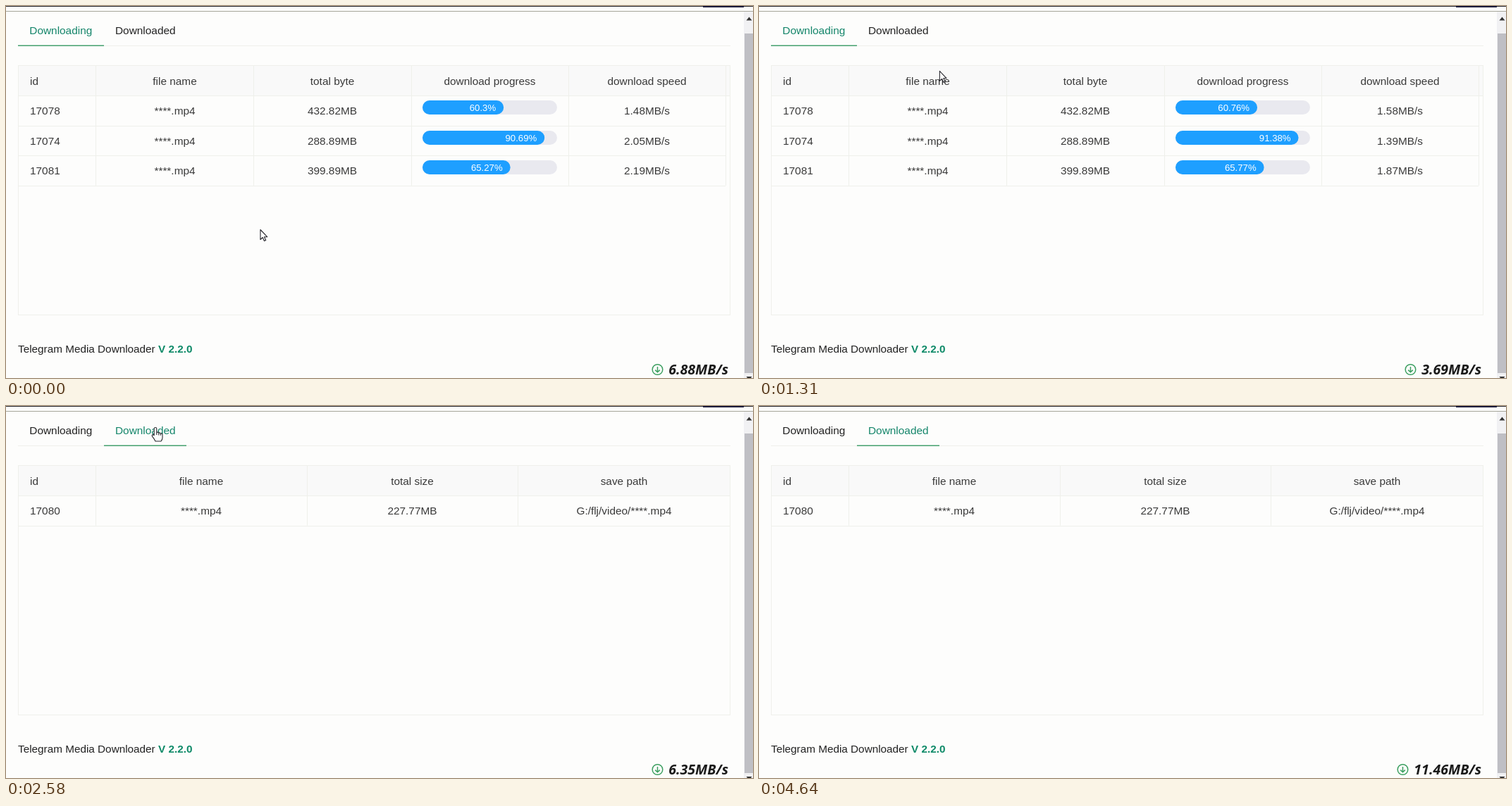
Animation of 1060 by 528 pixels, one loop 4820 ms. Source, as an HTML page:

```html
<!DOCTYPE html>
<html lang="en">
<head>
<meta charset="utf-8">
<title>Downloads</title>
<style>
html, body { margin: 0; width: 100%; height: 100%; overflow: hidden; background: #fdfdfc; }
svg { display: block; width: 1060px; height: 528px; font: 15.4px "Liberation Sans", Arial, sans-serif; }
.total { font: italic 700 19.6px "Open Sans", "Noto Sans", sans-serif; }
.percent { font-size: 13.2px; }
.footer { font-size: 15.3px; }
</style>
</head>
<body>
<svg id="stage" viewBox="0 0 1060 528"></svg>
<script>
const LOOP = 4820, ROW = 42.6;
const LINE = '#eff0eb', INK = '#3a3a3a', DARK = '#222222', GREEN = '#14856a';
const stage = document.getElementById('stage');

// Each update: [start time, value]
const totals = [[0, '6.88'], [450, '3.69'], [1480, '5.23'], [2500, '6.35'], [4580, '11.46']];
const files = [
  { id: 17078, size: '432.82', done: [60.3, 60.76, 61.23], speed: ['1.48', '1.58', '1.58'] },
  { id: 17074, size: '288.89', done: [90.69, 91.38, 92.08], speed: ['2.05', '1.39', '1.92'] },
  { id: 17081, size: '399.89', done: [65.27, 65.77, 66.02], speed: ['2.19', '1.87', '1.5'] }
];
const updates = [0, 760, 1700];
const SWITCH = 2110;

// Pointer tip: [time, x, y]
const path = [[0, 360.5, 317], [910, 360.5, 317], [1310, 256, 92], [1640, 212, 31],
  [2810, 212, 31], [3130, 120, 36], [3180, 120, 36], [3340, 470, 182], [3800, 1012, 532]];

const clamp = v => Math.max(0, Math.min(1, v));
const ease = v => { v = clamp(v); return v * v * (3 - 2 * v); };
const mix = (a, b, k) => a + (b - a) * k;
const text = (x, y, s, anchor = 'middle', fill = INK, extra = '') =>
  `<text x="${x}" y="${y}" text-anchor="${anchor}" fill="${fill}" ${extra}>${s}</text>`;
const rect = (x, y, w, h, fill, rx = 0) =>
  `<rect x="${x}" y="${y}" width="${w}" height="${h}" rx="${rx}" fill="${fill}"/>`;

function fade(from, to, k) {
  const rgb = c => c.match(/\w\w/g).map(h => parseInt(h, 16));
  const end = rgb(to);
  return `rgb(${rgb(from).map((v, i) => Math.round(mix(v, end[i], k)))})`;
}

function frame() {
  return rect(0, 0, 1060, 1, '#25252b') + rect(989, 0, 58, 2, '#1b1b3a') +
    rect(0, 7, 1060, 1, '#a5a599') +
    rect(1047, 8, 13, 520, '#f1f1f3') + rect(1048, 39, 12, 482, '#bfbfc4') +
    '<path d="M1050.5 20.5l4-5 4 5zM1050.5 526h8l-4 5z" fill="#333"/>' +
    rect(17, 56, 1011, 1, LINE) +
    text(17, 492, 'Telegram Media Downloader <tspan font-weight="700" fill="#0f8a68">V 2.2.0</tspan>',
      'start', DARK, 'class="footer"');
}

function tabs(t) {
  const k = clamp((t - 2200) / 250), second = t >= SWITCH;
  return text(33.3, 39.5, 'Downloading', 'start', fade(GREEN, DARK, k)) +
    text(155, 39.5, 'Downloaded', 'start', fade(DARK, GREEN, k)) +
    rect(second ? 139 : 17, 55.5, second ? 117 : 122, 1.5, '#45a06e');
}

function table(heads, centers, edges, rows, right) {
  let out = rect(17, 84, 1011, 43, '#f9f9f9') +
    `<rect x="17.5" y="84.5" width="1010" height="354" fill="none" stroke="${LINE}"/>`;
  for (let i = 0; i <= rows; i++)
    out += rect(17, Math.round(127 + ROW * i), (i ? right : 1028) - 17, 1, LINE);
  for (const x of edges) out += rect(x, 85, 1, 42 + ROW * rows, LINE);
  return out + text(34, 112, 'id', 'start') +
    heads.map((h, i) => text(centers[i], 112, h)).join('');
}

function downloading(t) {
  const n = updates.filter(u => t >= u).length - 1;
  const k = n ? ease((t - updates[n]) / 130) : 1;
  const centers = [239.5, 463, 686.5, 909.5];
  let out = table(['file name', 'total byte', 'download progress', 'download speed'],
    centers, [127, 351, 575, 798, 1021], 3, 1021);
  files.forEach((f, i) => {
    const y = Math.round(154 + ROW * i);
    const w = 1.91 * mix(f.done[Math.max(0, n - 1)], f.done[n], k);
    out += text(34, y, f.id, 'start') + text(centers[0], y, '****.mp4') +
      text(centers[1], y, f.size + 'MB') +
      rect(591, y - 20, 191, 20, '#e9e9ef', 10) + rect(591, y - 20, w, 20, '#1e9fff', 10) +
      text(591 + w - 11, y - 5, f.done[n] + '%', 'end', '#fff', 'class="percent"') +
      text(centers[3], y, f.speed[n] + 'MB/s');
  });
  return out;
}

function downloaded() {
  const centers = [277, 576.5, 877];
  const cells = ['****.mp4', '227.77MB', 'G:/flj/video/****.mp4'];
  return table(['file name', 'total size', 'save path'], centers, [127, 427, 726], 1, 1028) +
    text(34, 154, 17080, 'start') + cells.map((c, i) => text(centers[i], 154, c)).join('');
}

function total(t) {
  const value = totals.filter(s => t >= s[0]).pop()[1];
  const x = value.length > 4 ? 913.5 : 924.5;
  return `<g transform="translate(${x} 516)" fill="none" stroke="#3c9f60" stroke-width="1.5">
    <circle r="7.3"/><path d="M0-4V3.6M-3.3 .6L0 3.8 3.3 .6"/></g>` +
    text(1025, 523, value + 'MB/s', 'end', '#1a1a1a', 'class="total"');
}

function pointer(t) {
  const i = path.findIndex(p => p[0] > t);
  if (i < 0) return '';
  const [a, b] = [path[i - 1], path[i]];
  const k = (t - a[0]) / (b[0] - a[0]);
  const x = mix(a[1], b[1], k), y = mix(a[2], b[2], k);
  const shape = y < 57 && x > 17 && x < 256
    ? 'M-1.8 11V1.2Q-1.8-.5 0-.5T1.8 1.2V6.5Q3.5 5.4 4.8 7.2 6.4 6.3 7.4 8.1 10 7.4 10 10V14Q10 16.5 8 19H0Q-1.2 16-4.6 11.8-5.2 10-3.6 9.6-2.6 9.6-1.8 11M1.8 6.5V10M4.8 7.2V10.4M7.4 8.1V10.8'
    : 'M.5 .5V14.5L3.7 11.5 6 16.5 8.2 15.5 6 10.7H10.2Z';
  return `<path transform="translate(${x} ${y})" d="${shape}" fill="#fff" stroke="#26262c" stroke-width="1.1" stroke-linejoin="round"/>`;
}

function draw(now) {
  const t = now % LOOP;
  stage.innerHTML = frame() + tabs(t) + (t < SWITCH ? downloading(t) : downloaded()) +
    total(t) + pointer(t);
  requestAnimationFrame(draw);
}
draw(0);
</script>
</body>
</html>
```
